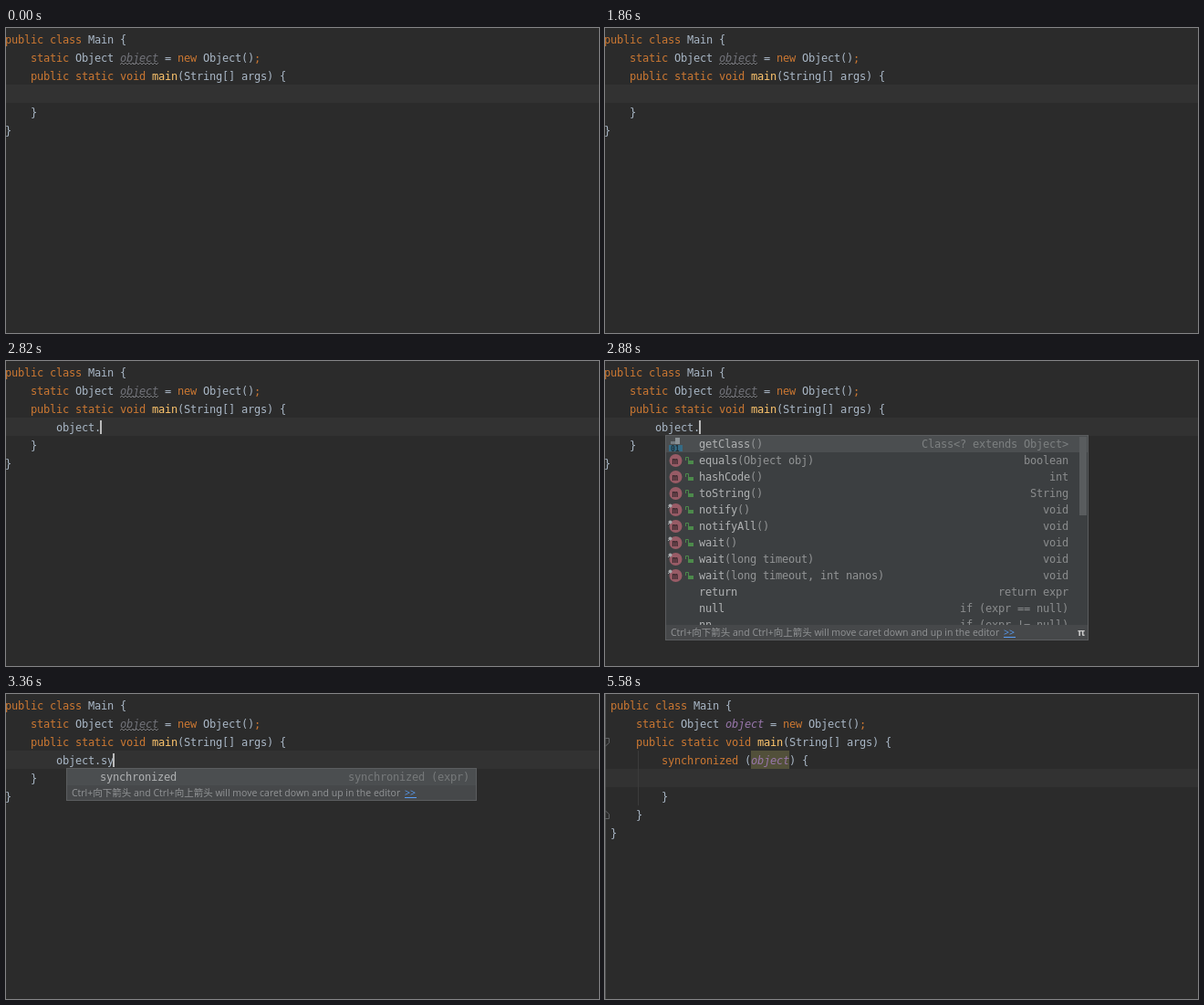
An HTML page with a canvas for the animation above (5.64 s loop, 650 by 334 pixels).

```html
<!DOCTYPE html>
<html lang="en">
<head>
<meta charset="utf-8">
<title>Code completion</title>
<style>
html, body { margin: 0; width: 100%; height: 100%; overflow: hidden; background: #2b2b2b; }
canvas { display: block; }
</style>
</head>
<body>
<canvas id="stage" width="650" height="334"></canvas>
<script>
const ctx = document.getElementById('stage').getContext('2d');
const LOOP = 5640, CELL = 7, LINE = 20;
const MONO = '"DejaVu Sans Mono", monospace';
const SANS = '"Open Sans", "Noto Sans CJK SC", "Noto Sans CJK", sans-serif';
const KEY = '#cc7832', TEXT = '#a9b7c6', NAME = '#ffc66d', FIELD = '#9876aa', UNUSED = '#72737a';

function box(x, y, w, h, color) {
  ctx.fillStyle = color;
  ctx.fillRect(x, y, w, h);
}

function path(points, color, close) {
  ctx.beginPath();
  points.forEach(([x, y]) => ctx.lineTo(x, y));
  if (close) ctx.closePath();
  ctx.strokeStyle = color;
  ctx.lineWidth = 1;
  ctx.stroke();
}

function dot(x, y, r, color) {
  ctx.beginPath();
  ctx.arc(x, y, r, 0, Math.PI * 2);
  ctx.fillStyle = color;
  ctx.fill();
}

// Editor text sits on a whole-pixel character grid.
function mono(str, x, y, color, style = '') {
  ctx.font = `${style} 12px ${MONO}`;
  ctx.letterSpacing = '0px';
  ctx.letterSpacing = `${CELL - ctx.measureText('0').width}px`;
  ctx.fillStyle = color;
  ctx.fillText(str, x, y);
  return x + str.length * CELL;
}

function label(str, x, y, color, font) {
  ctx.font = font;
  ctx.letterSpacing = '0px';
  ctx.fillStyle = color;
  ctx.fillText(str, x, y);
}

const right = (str, x, y, color) => mono(str, x - str.length * CELL, y, color);

function code(x, row, ...parts) {
  for (const [str, color = TEXT, style] of parts) x = mono(str, x, 17 + row * LINE, color, style);
}

function caret(x, row) {
  box(x - 1, row * LINE + 5, 2, 15, '#bbbbbb');
}

function wave(x, y, w) {
  const points = [];
  for (let i = 0; i <= w; i += 2) points.push([x + i, y + (i % 4 ? 0 : 2)]);
  path(points, '#77787c');
}

function header(x, used) {
  code(x, 0, ['public class ', KEY], ['Main {']);
  code(x + 28, 1, ['static ', KEY], ['Object '], ['object', used ? FIELD : UNUSED, 'italic'],
    [' = '], ['new ', KEY], ['Object()'], [';', KEY]);
  if (!used) wave(x + 126, 38, 42);
  code(x + 28, 2, ['public static void ', KEY], ['main', NAME], ['(String[] args) {']);
}

function typing(str, showCaret) {
  box(0, 62, 650, LINE, '#323232');
  header(-1, false);
  code(55, 3, [str]);
  code(27, 4, ['}']);
  code(-1, 5, ['}']);
  if (showCaret) caret(55 + str.length * CELL, 3);
}

function fold(y, dir) {
  const points = [[-1, y - 4 * dir], [4.5, y - 4 * dir], [4.5, y + dir], [.5, y + 4.5 * dir], [-1, y + 3 * dir]];
  path(points, '#606264', true);
}

function expanded(x, used, showCaret) {
  box(0, 82, 650, LINE, '#323232');
  if (x > 0) {
    box(0, 0, 1, 334, '#505152');
    box(36, 62, 1, 60, '#3b3b3b');
    fold(52.5, 1);
    fold(132.5, -1);
  }
  if (used) box(x + 154, 62, 42, LINE, '#52503a');
  header(x, used);
  code(x + 56, 3, ['synchronized ', KEY], ['('], ['object', used ? FIELD : TEXT, used ? 'italic' : ''], [') {']);
  code(x + 56, 5, ['}']);
  code(x + 28, 6, ['}']);
  code(x, 7, ['}']);
  if (showCaret) caret(x + 84, 4);
}

function panel(x, w, h) {
  box(x, 81, w, h, '#5b5d5f');
  box(x + 1, 82, w - 2, h - 2, '#3c3f41');
  box(x + 1, 82, w - 2, 18, '#4b4e50');
}

function hint(str, x, y, linkX) {
  const font = `10.5px ${SANS}`;
  label(str, x, y, '#929496', font);
  label('>>', linkX, y, '#589df6', font);
  box(linkX, y + 1, 13, 1, '#589df6');
}

function fieldPopup(withHint) {
  panel(17, 433, withHint ? 36 : 19);
  dot(28, 91, 7, '#8f6d36');
  label('f', 26, 95, '#2f2a25', `11px ${MONO}`);
  path([[20.5, 96], [22.5, 94], [24.5, 96], [22.5, 98]], '#96999b', true);
  ctx.beginPath();
  ctx.arc(44, 91, 2, 0, Math.PI * 2);
  ctx.strokeStyle = '#8b8e90';
  ctx.stroke();
  mono('ect', mono('obj', 55, 95, '#a4629f', 'bold'), 95, '#bbbbbb', 'bold');
  right('Object', 442, 95, '#777a7b');
  if (!withHint) return;
  box(18, 100, 431, 16, '#46484a');
  hint('Press Ctrl+. to choose the selected (or first) suggestion and insert a dot afterwards', 23, 112, 430);
}

const ARROWS = 'Ctrl+向下箭头 and Ctrl+向上箭头 will move caret down and up in the editor';
const ITEMS = [
  ['getClass', '()', 'Class<? extends Object>'],
  ['equals', '(Object obj)', 'boolean'],
  ['hashCode', '()', 'int'],
  ['toString', '()', 'String'],
  ['notify', '()', 'void'],
  ['notifyAll', '()', 'void'],
  ['wait', '()', 'void'],
  ['wait', '(long timeout)', 'void'],
  ['wait', '(long timeout, int nanos)', 'void'],
  ['return', '', 'return expr'],
  ['null', '', 'if (expr == null)'],
  ['nn', '', 'if (expr != null)']
];

function classIcon() {
  box(77, 84, 5, 7, '#8b9296');
  box(72, 88, 5, 3, '#737b80');
  box(70, 92, 15, 7, '#356b85');
  label('01', 72, 99, '#1f3038', `bold 8px ${MONO}`);
}

function methodIcon(y, pinned) {
  dot(77.5, y, 7, '#985b66');
  label('m', 73.5, y + 4, '#33262a', `bold 11px ${MONO}`);
  if (pinned) {
    dot(71.5, y - 4.5, 2, '#a5a8aa');
    path([[69, y - 2], [71, y - 4]], '#a5a8aa');
  }
  box(91, y, 6, 4, '#4c8a4b');
  path([[88.5, y], [88.5, y - 3.5], [91.5, y - 3.5], [91.5, y]], '#4c8a4b');
}

function memberPopup() {
  panel(66, 464, 225);
  ctx.save();
  ctx.beginPath();
  ctx.rect(67, 82, 462, 207);
  ctx.clip();
  ITEMS.forEach(([name, args, type], i) => {
    const y = 95 + i * 18;
    mono(args, mono(name, 103, y, '#b0b2b3'), y, '#929495');
    right(type, 508, y, i ? '#8b8d8e' : '#7d8081');
    if (i > 0 && i < 9) methodIcon(y - 4, i > 3);
  });
  classIcon();
  box(520, 83, 8, 86, '#595c5e');
  ctx.restore();
  box(67, 289, 462, 16, '#46484a');
  hint(ARROWS, 72, 301, 437);
  label('π', 518, 301, '#c8c8c8', `bold 11px ${SANS}`);
}

function syncPopup() {
  panel(66, 450, 36);
  mono('synchronized', 103, 95, '#b0b2b3');
  right('synchronized (expr)', 508, 95, '#777a7b');
  box(67, 100, 448, 16, '#46484a');
  hint(ARROWS, 72, 112, 437);
}

// Each step holds from its time until the next one.
const STEPS = [
  [0, () => typing('', false)],
  [900, () => typing('', true)],
  [1860, () => typing('', false)],
  [2040, () => typing('o', true)],
  [2100, () => typing('ob', true)],
  [2160, () => typing('obj', true)],
  [2220, () => { typing('obj', true); fieldPopup(false); }],
  [2280, () => { typing('obj', true); fieldPopup(true); }],
  [2640, () => typing('object', true)],
  [2820, () => typing('object.', true)],
  [2880, () => { typing('object.', true); memberPopup(); }],
  [3300, () => { typing('object.s', true); memberPopup(); }],
  [3360, () => { typing('object.sy', true); syncPopup(); }],
  [3600, () => expanded(-1, false, true)],
  [3660, () => expanded(6, false, true)],
  [3900, () => expanded(6, true, true)],
  [4740, () => expanded(6, true, false)],
  [5220, () => expanded(6, true, true)],
  [5580, () => expanded(6, true, false)]
];

function frame() {
  const t = performance.now() % LOOP;
  box(0, 0, 650, 334, '#2b2b2b');
  STEPS.findLast(([start]) => start <= t)[1]();
  requestAnimationFrame(frame);
}
frame();
</script>
</body>
</html>
```
